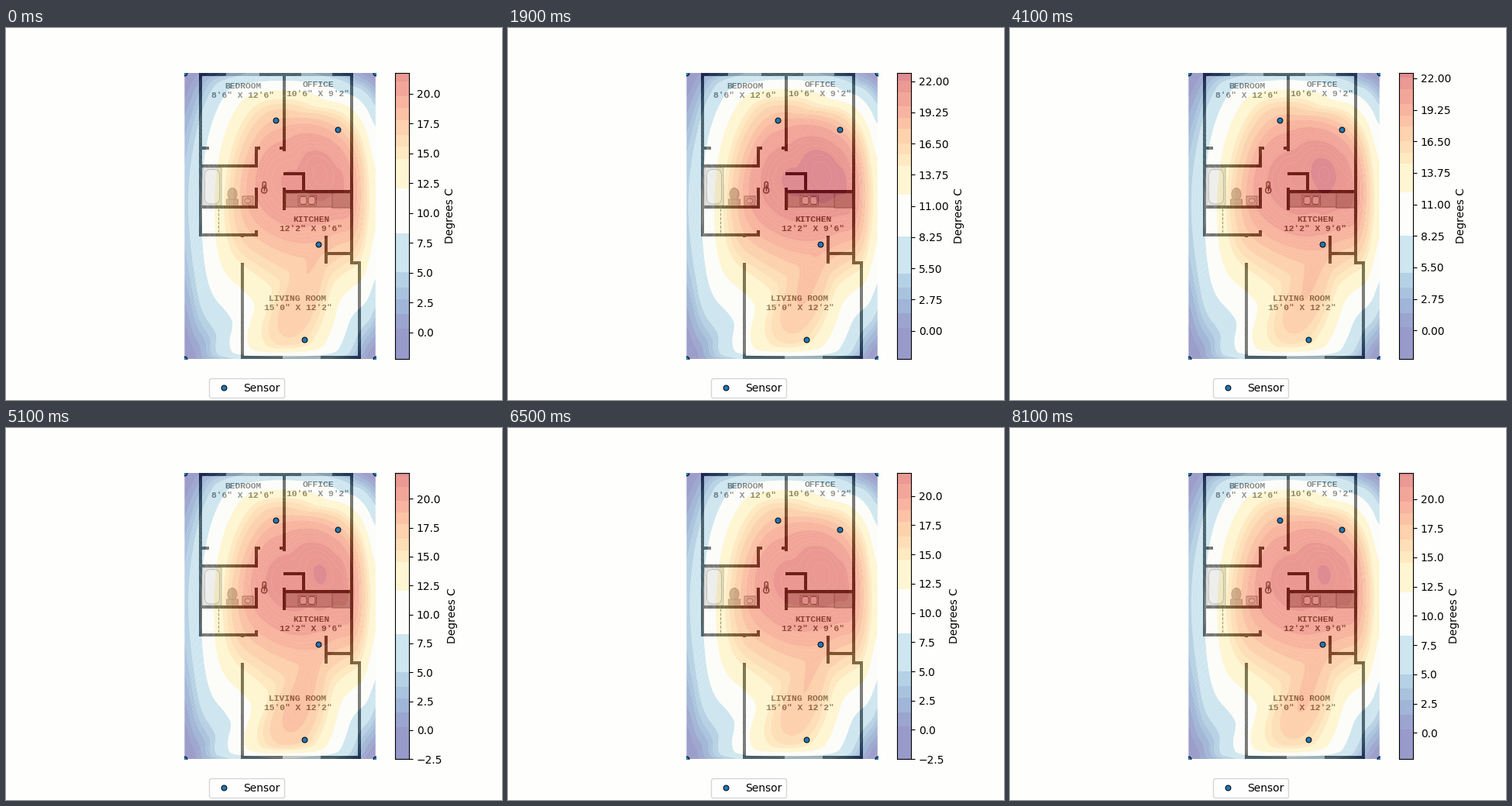
Write a matplotlib script that moves like this. It is 640 px wide and 480 px high and loops after 8.2 s.

```python
import math

import matplotlib.pyplot as plt
import numpy as np
from matplotlib.animation import FuncAnimation
from matplotlib.collections import LineCollection
from matplotlib.patches import Circle, Ellipse, FancyBboxPatch
from matplotlib.tri import CubicTriInterpolator, Triangulation

W, H, FRAMES, STEP_MS = 640, 480, 82, 100
LEFT, RIGHT, TOP, BOTTOM = 230.4, 476.8, 57.6, 427.2
PX = 0.72  # points per pixel at 100 dpi
ALPHA = 0.5
LEVEL = 0.25

fig = plt.figure(figsize=(W / 100, H / 100), dpi=100, facecolor="#fefefc")


def add_axes(x0, x1):
    return fig.add_axes([x0 / W, 1 - BOTTOM / H, (x1 - x0) / W, (BOTTOM - TOP) / H])


# The floor plan is laid out in stage pixels, y pointing down.
ax = add_axes(LEFT, RIGHT)
ax.set(xlim=(LEFT, RIGHT), ylim=(BOTTOM, TOP))
ax.axis("off")


def lines(paths, width, color, z=0.5, **kw):
    ax.add_collection(LineCollection(paths, linewidths=width * PX, colors=color,
                                     joinstyle="miter", zorder=z, **kw), autolim=False)


def shape(patch, face, edge="#777777", width=1):
    patch.set(facecolor=face, edgecolor=edge, linewidth=width * PX, zorder=0.3)
    ax.add_patch(patch)


def box(x, y, w, h, face, edge="#777777", r=0.01, **kw):
    style = f"round,pad=0,rounding_size={r}"
    shape(FancyBboxPatch((x, y), w, h, boxstyle=style), face, edge, **kw)


def draw_fixtures():
    # bathroom and closet rail
    box(254, 180, 24, 49, "#d2d2d2", "#8a8a8a")
    box(256.5, 182.5, 19, 44.5, "#e2e2e2", "#8a8a8a", r=7)
    shape(Ellipse((292, 214.5), 12, 16), "#a8a8a8", "#8a8a8a")
    box(284.5, 221, 15, 7, "#a8a8a8", "#8a8a8a")
    box(305, 217, 14, 11, "#cccccc")
    shape(Ellipse((312, 223), 8, 6), "#dddddd")
    lines([[(274, 233), (274, 264)]], 1.2, "#555555", linestyles=[(0, (3, 1.5))])
    # kitchen counter, fridge and sink
    box(361, 213, 84, 18, "#b4b4b4", "#666666")
    box(421, 213, 24, 19, "#a8a8a8", "#666666")
    box(377, 216, 23.5, 13, "#cccccc", "#666666")
    for x in (379, 390):
        box(x, 217.5, 9, 10, "#e6e6e6", "#444444", r=2.5)
    # thermostat
    box(331, 198.5, 4.4, 11.5, "#eeeeee", "#222222", r=2, width=1.3)
    shape(Circle((333.2, 209.5), 3.6), "#eeeeee", "#222222", width=1.3)
    lines([[(333.2, 202), (333.2, 210)]], 1.4, "#222222")


def draw_walls():
    outer = [(323, 261), (323, 266.5), (251, 266.5), (251, 60), (446, 60),
             (446, 303), (456, 303), (456, 425), (305, 425), (305, 303)]
    inner = [
        [(359, 60), (359, 159)],
        [(353, 155), (359, 155)],
        [(251, 155), (262, 155)],
        [(251, 177.5), (323, 177.5), (323, 155), (328, 155)],
        [(251, 231), (323, 231), (323, 206)],
        [(305, 266), (305, 270)],
        [(358, 188), (384, 188), (384, 211)],
        [(359.5, 211), (446, 211)],
        [(359.5, 206), (359.5, 235)],
        [(413.5, 268), (413.5, 304)],
        [(413.5, 291), (446, 291)],
    ]
    lines([outer, *inner], 4, "#0a0a0a")
    windows = [(284, 327, 60), (381, 421, 60), (357, 406, 425)]
    lines([[(x0, y), (x1, y)] for x0, x1, y in windows], 4, "#9c9c9c", z=0.6)


def draw_rooms():
    rooms = [("BEDROOM", "8'6\" X 12'6\"", 305.5, 74.5),
             ("OFFICE", "10'6\" X 9'2\"", 403, 72.5),
             ("KITCHEN", "12'2\" X 9'6\"", 394, 246.5),
             ("LIVING ROOM", "15'0\" X 12'2\"", 376.5, 348.5)]
    for name, size, x, y in rooms:
        for text, dy in ((name, 0), (size, 12.7)):
            ax.text(x, y + dy, text, ha="center", va="center", fontsize=8.1,
                    family="Liberation Mono", weight="bold", color="#303030", zorder=0.7)


draw_fixtures()
draw_walls()
draw_rooms()

# Sensors: four in the rooms, four outdoors at the corners.
ROOMS = [(348, 119), (428, 131), (403, 279), (385, 402)]
POS = np.array(ROOMS + [(x, y) for x in (LEFT, RIGHT) for y in (TOP, BOTTOM)])
sensors, = ax.plot(*POS.T, "o", ms=5, mfc="#1f77b4", mec="black", mew=0.7,
                   zorder=5, label="Sensor")
fig.legend(handles=[sensors], loc="upper left", borderaxespad=0,
           bbox_to_anchor=(262 / W, 1 - 452.3 / H))


def slopes(mesh):
    """Gradients, per unit reading, that bend the mesh edges least."""
    n = len(POS)
    lhs, rhs = np.zeros((n, 2, n, 2)), np.zeros((n, 2, n))
    for a, b in np.vstack([mesh.edges, mesh.edges[:, ::-1]]):
        e = POS[b] - POS[a]
        cube = np.hypot(*e) ** 3
        lhs[a, :, a] += 4 * np.outer(e, e) / cube
        lhs[a, :, b] += 2 * np.outer(e, e) / cube
        rhs[a, :, b] += 6 * e / cube
        rhs[a, :, a] -= 6 * e / cube
    return np.linalg.solve(lhs.reshape(2 * n, -1), rhs.reshape(2 * n, n)).reshape(n, 2, n)


# The surface is linear in the readings, so one unit field per sensor is enough.
GX, GY = np.meshgrid(np.linspace(LEFT + 0.01, RIGHT - 0.01, 90),
                     np.linspace(TOP + 0.01, BOTTOM - 0.01, 134))
mesh = Triangulation(*POS.T)
grads = slopes(mesh)
BASIS = np.array([
    np.ma.filled(CubicTriInterpolator(mesh, unit, kind="user",
                                      dz=(grads[:, 0, k], grads[:, 1, k]))(GX, GY), 0)
    for k, unit in enumerate(np.eye(len(POS)))])

# Hottest point of the flat over time, in seconds and degrees.
HIGH_T = [0, 0.8, 1.0, 1.9, 3.1, 3.7, 5.1, 6.5, 8.1]
HIGH = [21.6, 21.9, 22.4, 22.7, 22.7, 22.4, 22.1, 21.9, 22.1]

# Colours step through a few bands on a 0 to 24 degree scale.
EDGES = np.r_[np.linspace(0.3, 5, 5), 8.25, 12.05, np.linspace(14.4, 22, 8)]
mids = np.r_[0, (EDGES[1:] + EDGES[:-1]) / 2, 22.6]
TONES = plt.get_cmap("RdYlBu_r")(mids / 24)[:, :3]
TONES[6] = (0.988, 0.992, 0.976)

cax = add_axes(501.6, 520.1)
bar = cax.imshow(np.ones((2, 1, 3)), aspect="auto", origin="lower",
                 interpolation="nearest", extent=(0, 1, 0, 1))
cax.set_xticks([])
cax.yaxis.tick_right()
cax.yaxis.set_label_position("right")
cax.set_ylabel("Degrees C")


def surface(t):
    high = np.interp(t, HIGH_T, HIGH)
    low = -2.2 - 0.16 * math.sin(math.pi * t / 7.5)
    living = 17.4 + 0.6 * math.sin(math.tau * (t - 0.25) / 2.2)
    readings = [high - 2.2, high - 2, high - 1.4, living] + [low] * 4
    raw = np.tensordot(readings, BASIS, 1)
    return low + (raw - raw.min()) * (high - low) / np.ptp(raw), low, high


layers = []


def draw(i):
    field, low, high = surface(i * STEP_MS / 1000 if i > 1 else 0)
    first, last = math.floor(low / LEVEL), math.ceil(high / LEVEL)
    levels = np.arange(first, last + 1) * LEVEL
    colors = TONES[np.searchsorted(EDGES, levels[:-1] + LEVEL / 2)]
    while layers:
        layers.pop().remove()
    layers.append(ax.contourf(GX, GY, field, levels=levels, colors=list(colors),
                              alpha=ALPHA, antialiased=True, zorder=4))

    bar.set_data((1 - ALPHA + ALPHA * colors)[:, None, :])
    bar.set_extent((0, 1, levels[0], levels[-1]))
    cax.set_ylim(levels[0], levels[-1])
    every = math.ceil(len(levels) / 10)
    cax.set_yticks([k * LEVEL for k in range(first, last + 1) if k % every == 0])
    return []


anim = FuncAnimation(fig, draw, frames=FRAMES, interval=STEP_MS, repeat=True,
                     repeat_delay=0, blit=False)
plt.show()
```
